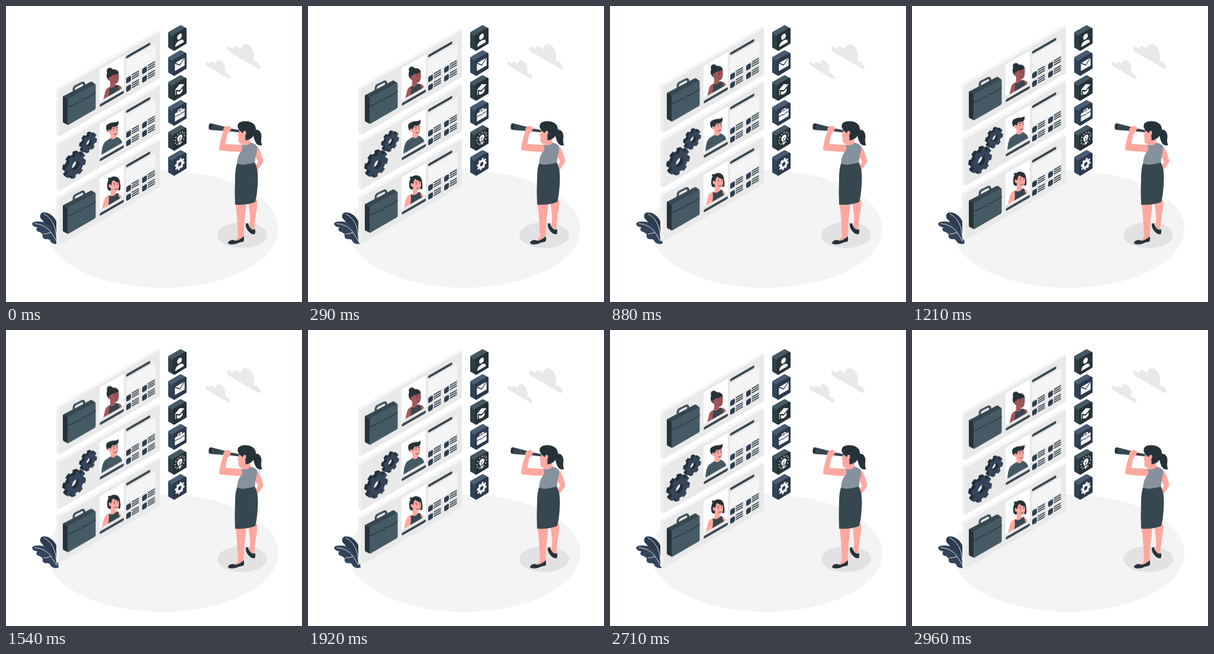
An HTML page without scripts for the animation above (3000 ms loop, 500x500 px).

```html
<!DOCTYPE html>
<html lang="en">
<head>
<meta charset="utf-8">
<title>Choosing a candidate</title>
<style>
html, body { margin: 0; width: 100%; height: 100%; overflow: hidden; background: #fff; }
svg { display: block; width: 100%; height: 100%; }
.cards { animation: float 3s linear infinite; }
@keyframes float { 50% { transform: translateY(-10px); } }
.slate { --front: #263238; --side: #2f3d44; --top: #455a64; }
.navy { --front: #2c3a4d; --side: #324357; --top: #4b5d72; }
.ink { fill: #263238; }
.steel { fill: #37474f; }
.mid { fill: #455a64; }
.skin { fill: #ffa8a0; }
.brown { fill: #a4575a; }
.line { fill: none; stroke-linecap: round; stroke-linejoin: round; }
.glyph { fill: #f5f5f5; stroke: none; }
</style>
</head>
<body>
<svg viewBox="0 0 500 500">
<defs>
  <g id="label" stroke="#37474f" stroke-width="2">
    <rect x="-4" y="-4.5" width="8" height="9.5" rx="2.2" fill="#2f3e50" stroke="none"/>
    <path d="M5.5-4.2H17.5M5.5-.6H17.5M5.5 3H17.5"/>
  </g>

  <clipPath id="frame"><path d="M158 90H199V137.5L158 161.2Z"/></clipPath>

  <g id="card">
    <path d="M85 138.3 90 141V220.3L85 217.4Z" fill="#f0f0f0"/>
    <path d="M85 138.3 255.500 40.500Q257.500 40.500 260 43L90 141Z" fill="#f7f7f7"/>
    <g transform="translate(90 141) skewY(-30)">
      <rect width="170" height="79" fill="#e9e9e9"/>
      <rect x="68" y="5.500" width="41" height="54" rx="1.500" fill="#fff"/>
      <path class="line" d="M70.500 67H107M115 11.200H151.500" stroke="#37474f" stroke-width="4.600"/>
      <path d="M113 19H162M113 22.800H162M113 26.600H162M113 30.400H162M113 34.200H162M113 38H162M113 41.800H162" stroke="#fff" stroke-width="2.200"/>
      <use href="#label" x="117" y="50.500"/>
      <use href="#label" x="144" y="50.500"/>
      <use href="#label" x="117" y="65"/>
      <use href="#label" x="144" y="65"/>
    </g>
  </g>

  <g id="case">
    <path class="line" d="M114.500 145V140Q115 136.500 118 135L128 130Q132 128.500 132 132V137" stroke="#37474f" stroke-width="3.600"/>
    <path class="line" d="M115 144V139.500Q115.500 136 118.500 134.500L128 129.500" stroke="#53677a" stroke-width="1.200"/>
    <path class="ink" d="M96 153.500Q96 152 97.500 152.500L105 157V201.300L97.500 197.500Q96 196.800 96 195Z"/>
    <path class="steel" d="M96.500 152.500 143 128Q144.500 127.500 146 128.500L151.500 132.500 104.500 158Z"/>
    <path class="mid" d="M104 158.500Q104 157 105.500 156L149.500 132.300Q151.500 131.500 151.500 133.500V172Q151.500 174 150 175L106 200.500Q104 201.700 104 199.500Z"/>
    <path class="line" d="M104 170.500Q111 169.500 121 162.800M130 158Q139 155 151.500 146" stroke="#263238" stroke-width="1.100"/>
    <path d="M121.500 160.500 130.500 155.500V159Q129 162.500 125.500 163.500 122 164.500 121.500 163Z" fill="#37474f"/>
    <path d="M123.500 161 129 158" stroke="#607685"/>
  </g>

  <!-- unit cog: ring plus dashed teeth -->
  <g id="cog" fill="none" stroke="currentColor" transform="matrix(.866 -.5 0 1 0 0)">
    <circle r="11.500" stroke-width="9"/>
    <circle r="17.500" stroke-width="5.500" pathLength="16" stroke-dasharray="1.050 .95"/>
  </g>
  <g id="gear">
    <g color="#222f3a">
      <use href="#cog" x="-5" y="-2.900"/><use href="#cog" x="-4" y="-2.300"/>
      <use href="#cog" x="-3" y="-1.700"/><use href="#cog" x="-2" y="-1.150"/>
      <use href="#cog" x="-1" y="-.58"/>
    </g>
    <use href="#cog" color="#35465a"/>
  </g>

  <g id="box">
    <path d="M-17.500-10.500 1.500-21.500 9.500-17V6L-9.500 17.500-17.500 13Z" fill="var(--side)" stroke="var(--side)" stroke-width="4" stroke-linejoin="round"/>
    <path d="M-17.500-10.500 1.500-21.500 9.500-17-9.500-6Z" fill="var(--top)" stroke="var(--top)" stroke-width="3.600" stroke-linejoin="round"/>
    <path d="M-9.500-6 9.500-17V6L-9.500 17.500Z" fill="var(--front)" stroke="var(--front)" stroke-width="4" stroke-linejoin="round"/>
  </g>
</defs>

<rect width="500" height="500" fill="#fff"/>
<ellipse cx="264" cy="377" rx="196" ry="99" fill="#f4f4f4"/>

<g fill="#e9e9e9">
  <path d="M374 70Q375 67.500 379 69.500L385 73Q384 67.500 388 68Q393 68.500 397 73.500Q398 64 406 64.500Q415 66 418.500 79Q420 86 418 93Q427 94 430 103Q430.500 108 425 105.500L377 77.500Q373.500 74.500 374 70Z"/>
  <path d="M337 95.500Q338 93.500 341 95L345.500 98Q344.500 94 348 94.500Q351.500 95 354 98Q355 91 360 91.500Q367 93 370 102Q371.500 107 370 112.500Q376 113 379 120Q379.500 124 375.500 122.500L339 101Q336.500 98.500 337 95.500Z"/>
</g>

<g>
  <path d="M88 402Q74 389 70 377Q67 367 58 358Q56 350 63 348.500Q75 348 83 360Q88 368 89 380Z" fill="#2c3b4e"/>
  <path d="M89 401Q81 404 76 399Q74 393 68 394Q60 393 62 386Q59 382 54 381Q49 378 53 374Q45 373 44 368Q45 364 54 364Q66 363 74 372Q81 380 86 389Z" fill="#33445a"/>
  <path class="line" d="M64 351Q78 358 83 376Q85 388 86 396M49 367.500Q66 369 75 381Q82 391 85 397M64 385Q70 385 76 382.500" stroke="#dfe3e8" stroke-width="1"/>
</g>

<g class="cards">
  <g>
    <use href="#card"/>
    <use href="#case"/>
    <g clip-path="url(#frame)">
      <path class="brown" d="M173 138Q168 140 167 147L163 164H196V141Q195 134 190 134L184 133V127H176V136Z"/>
      <path class="steel" d="M174 137.500Q180 141 186 133L190 134Q190 139 193 142V160H171Q175 148 174 137.500Z"/>
      <circle class="ink" cx="175.500" cy="109.500" r="5.300"/>
      <path class="ink" d="M170 119Q169 110 178 107.500Q188 105.500 190.500 113L190 120 178 128Q171 125 170 119Z"/>
      <path class="brown" d="M174 120Q177 121 179 117Q185 117 189.500 113.500Q191.500 119 190 126Q188 132 183 132Q177 130.500 176 125.500Q172 125 174 120Z"/>
      <path class="line" d="M182.500 119.500 185 118.500M188 118 190 117.500M184 128Q186 128.500 188 127" stroke="#4b2d33" stroke-width=".8"/>
      <circle class="ink" cx="184" cy="122" r=".7"/><circle class="ink" cx="188.800" cy="121" r=".7"/>
    </g>
  </g>

  <g transform="translate(0 92)">
    <use href="#card"/>
    <use href="#gear" transform="translate(140.500 139.500) scale(.76)"/>
    <use href="#gear" x="117.500" y="177.500"/>
    <g clip-path="url(#frame)">
      <path class="mid" d="M161 165Q161 143 168 137L177 131 187 129Q196 132 197 142V165Z"/>
      <path class="line" d="M170 143Q167 150 167 157M192 137Q194 141 194 147" stroke="#37474f" stroke-width="1"/>
      <path class="skin" d="M176 121H186V130Q183 135 177 132Z"/>
      <path class="ink" d="M170.500 119Q167 111 172 107.500Q178 104 183 104.500Q188 104 190 102Q191 108 188 111L176 122Z"/>
      <path class="skin" d="M173 117Q176 116 177 119Q178 114 180 112Q185 113 188 110.500Q190.500 117 189 123Q187 129 182 128.500Q177 127 176 123Q171 122 173 117Z"/>
      <path class="line" d="M180.500 114.800 183.500 114M186.500 113.500 189 113M182.500 124.500Q185 125.500 187 123.500" stroke="#263238" stroke-width=".9"/>
      <circle class="ink" cx="182.500" cy="117.500" r=".8"/><circle class="ink" cx="187.500" cy="116.500" r=".8"/>
    </g>
  </g>

  <g transform="translate(0 184)">
    <use href="#card"/>
    <use href="#case"/>
    <g clip-path="url(#frame)">
      <path class="ink" d="M171 117Q172 106 181 104Q191 103 192.500 113Q194 121 193 127L175 128Q170 127 171 117Z"/>
      <path class="ink" d="M172 109Q172 105 175 106L177 109Z"/>
      <path class="skin" d="M173 136Q167 138 165 146L161 164H196V142Q195 134 189 133L185 132V125H177V135Z"/>
      <path class="steel" d="M173.500 136Q181 140 187 132L190 133Q190 138 193 141V160H171Q175 148 173.500 136Z"/>
      <path class="skin" d="M174 117Q177 117 178 119Q178 113 181 110Q186 114 190.500 114Q192 120 190 125Q188 130 183.500 129.500Q178 128 177 123.500Q172 122.500 174 117Z"/>
      <path class="line" d="M181.500 116 184 115.500M188 115 190 114.800M183.500 125.500Q186 126.500 188 124.500" stroke="#263238" stroke-width=".8"/>
      <circle class="ink" cx="183.500" cy="118.500" r=".8"/><circle class="ink" cx="188.700" cy="117.500" r=".8"/>
    </g>
  </g>
</g>

<g transform="translate(293.500 56)">
  <g class="slate">
    <use href="#box"/>
    <g class="glyph" transform="matrix(.866 -.5 0 1 0 0)">
      <circle cx="-.5" cy="-4.500" r="4.600"/><path d="M-9 9Q-9 2-1 2Q8 2 8 9Z"/>
    </g>
  </g>
  <g class="navy" transform="translate(0 42.200)">
    <use href="#box"/>
    <g class="glyph" transform="matrix(.866 -.5 0 1 0 0)">
      <rect x="-9.500" y="-6.500" width="19" height="13.500" rx="1"/>
      <path class="line" d="M-9-6 0 1.500 9-6" style="fill:none;stroke:var(--front);stroke-width:1.500"/>
    </g>
  </g>
  <g class="slate" transform="translate(0 84.400)">
    <use href="#box"/>
    <g class="glyph" transform="matrix(.866 -.5 0 1 0 0)">
      <path d="M0-8.500 9.500-3.500 0 1.500-9.500-3.500ZM-5.500 1 0 4 5.500 1V6Q0 10.500-5.500 6ZM-8.800-2.500V6H-7.600V-2Z"/>
    </g>
  </g>
  <g class="navy" transform="translate(0 126.600)">
    <use href="#box"/>
    <g class="glyph" transform="matrix(.866 -.5 0 1 0 0)">
      <path class="line" d="M-3.500-5V-8H3.500V-5" style="fill:none;stroke:#f5f5f5;stroke-width:1.600"/>
      <rect x="-9.500" y="-5.500" width="19" height="13.500" rx="1.200"/>
      <path d="M-9.500 0H-1.500M1.500 0H9.500M-1.500 1H1.500" stroke="var(--front)" stroke-width="1.200"/>
    </g>
  </g>
  <g class="slate" transform="translate(0 168.800)">
    <use href="#box"/>
    <g class="glyph" transform="matrix(.866 -.5 0 1 0 0)">
      <path d="M-2.500 4Q-2.500 2.500-4 1Q-6-2-4.500-4.500Q-3-7 0-7Q3-7 4.500-4.500Q6-2 4 1Q2.500 2.500 2.500 4ZM-2.300 5H2.300V8Q0 10.500-2.300 8Z"/>
      <path class="line" d="M-1.500-2 0 0 1.500-2M0 0V4" style="stroke:var(--front);stroke-width:.8"/>
      <circle cy="-1.500" r="9.200" style="fill:none;stroke:#f5f5f5;stroke-width:2.400" pathLength="24" stroke-dasharray=".6 1.400" stroke-dashoffset="-10"/>
    </g>
  </g>
  <g class="navy" transform="translate(0 211)">
    <use href="#box"/>
    <g color="#f5f5f5" transform="scale(.47)"><use href="#cog"/></g>
  </g>
</g>

<ellipse cx="399" cy="387" rx="42" ry="22" fill="#e2e2e2"/>
<g>
  <path class="skin" d="M409 328 424 327Q425 340 421.500 355L419 379Q414 381 410 374Q413 364 412 352Z"/>
  <path class="ink" d="M405 370Q405 366 409 367.500Q411 375 416 377.500Q419 378.500 420.500 376.500Q422 381 420.500 385Q416 387 411 382Q405 376 405 370Z"/>
  <path class="skin" d="M388 332H406Q405 349 402.500 364L401.500 391Q398 398 384 397Q390 394 392 389L390.500 361Z"/>
  <path class="ink" d="M375 400Q376 396 383 395Q388 398 394 394.500Q399 392 401.500 389Q403 394 401 398Q394 399 388 402Q376 404 375 400Z"/>

  <path class="skin" d="M421 235Q428 239 430 247L434.500 261Q435 264 432 267L423 280 418 275 426 263 418 249Z"/>
  <path d="M397 234.500Q406 234 412 230.500Q421 232 424 237Q425 243 422 252L420 267H390Q391 254 396 247Z" fill="#85929d"/>
  <path class="steel" d="M390 266.500Q405 269 420.500 264.500Q426 276 425.500 292Q425 316 421 331Q407 337 387 335.500Q386 314 387 291Q387 276 390 266.500Z"/>

  <path class="skin" d="M400 222 412 220 413 231Q408 237 399 235Z"/>
  <path class="ink" d="M417 212Q421 207 427 210Q432 214 431.500 222Q430 228 432.500 235Q426 237 422 231Q418 224 417 212Z"/>
  <path class="ink" d="M391.500 205Q390 197 399 195Q413 192.500 420 201Q425 210 419 218Q414 226 405 227L396 214Z"/>
  <path class="skin" d="M393 210Q398 212 400 215Q401 210 404.500 211Q407 214 404 219Q406 225 402 231Q398 235 394 231Q391.500 227 393 221L391 218.500 393 215Z"/>

  <path class="steel" d="M343 200Q344 197.500 348 198.500L381 207 393.500 209.500V213.500L376 211.500 347 209.500Q342 208.500 342.500 203Z"/>
  <ellipse class="ink" cx="345" cy="203.700" rx="2.300" ry="5.200" transform="rotate(8 345 203.700)"/>
  <path class="line" d="M379 207V211.500" stroke="#263238"/>
  <path class="skin" d="M367 212Q366 206 371 203.500Q375 201.500 378 204L382 206.500Q382 208.500 378.500 208.500Q380 211 377 213L373.500 217 370.500 233 397 234.500Q402 240 397 246.500Q380 246 363 244Q359 243.500 360 239Q362 226 367 212Z"/>
</g>
</svg>
</body>
</html>
```
